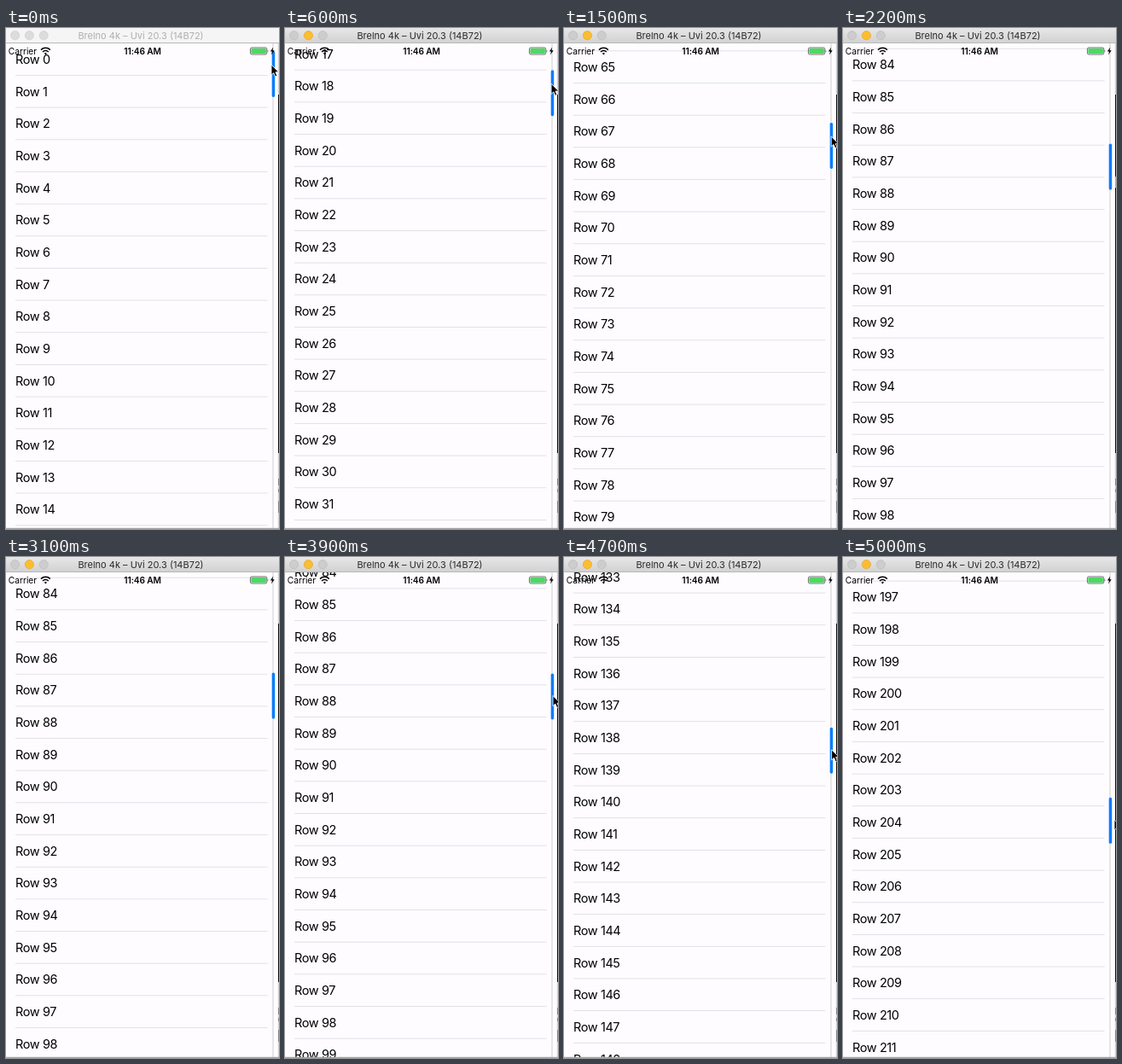
An HTML page that plays this animation: 320x587 px, repeating every 5100 ms.

```html
<!DOCTYPE html>
<html lang="en">
<head>
<meta charset="utf-8">
<style>
  html, body { margin: 0; width: 100%; height: 100%; overflow: hidden; background: #fefcff; }
  svg { display: block; width: 100%; height: 100%; }
  text { font-family: Inter, Roboto, sans-serif; white-space: pre; }
  #rows text { font-size: 14.5px; letter-spacing: -.4px; }
  #rows rect { fill: #dfdee2; }
</style>
</head>
<body>
<svg viewBox="0 0 320 587">
  <defs>
    <linearGradient id="active" x2="0" y2="1">
      <stop stop-color="#e8e7e8"/><stop offset="1" stop-color="#d2d1d2"/>
    </linearGradient>
  </defs>
  <rect width="320" height="587" fill="#fefcff"/>
  <g id="rows"></g>
  <rect x="312.5" y="18" width="1" height="568" fill="#cfced2"/>
  <rect id="thumb" x="311.7" width="3.5" height="54" rx="1.7" fill="#087cfb"/>

  <g font-size="10.2">
    <text x="2.8" y="30.8">Carrier</text>
    <text x="160" y="30.8" text-anchor="middle" font-weight="600" letter-spacing="-.15">11:46 AM</text>
  </g>
  <g fill="none" stroke="#000" stroke-width="1.5">
    <path d="M41 25.6a7.6 7.6 0 0 1 10.8 0M43 28a4.8 4.8 0 0 1 6.8 0"/>
    <path d="M46.4 31.4l-1.6-1.7a2.3 2.3 0 0 1 3.2 0z" fill="#000" stroke="none"/>
  </g>
  <rect x="286.4" y="23" width="19.4" height="8" rx="1.8" fill="none" stroke="#333" stroke-width=".7"/>
  <rect x="287.3" y="23.9" width="17.6" height="6.2" rx="1" fill="#4cd964"/>
  <path d="M306.7 25.5q1.5 1.5 0 3z" fill="#333"/>
  <path d="M313.2 22.4l-3.3 5h2.1l-1 4 3.7-5.2h-2.2z"/>

  <rect id="bar" width="320" height="17.5"/>
  <rect y="17" width="320" height="1" fill="#b9b8b9"/>
  <g id="lights" stroke-width=".6"></g>
  <text id="title" x="158" y="13" font-size="11" text-anchor="middle">Brelno 4k – Uvi 20.3 (14B72)</text>

  <rect x="318.8" y="18" width="1.2" height="569" fill="#d4d3d5"/>
  <rect x="319" y="78" width="1" height="420" fill="#111"/>
  <path d="M319.5 528v8m0 4v4m0 10v14" stroke="#888"/>
  <rect y="585.8" width="320" height="1.2" fill="#a3a2a4"/>
  <path id="cursor" d="M0 0V12.2L2.8 9.6 4.7 14 6.9 13.1 5 8.8H8.8Z" stroke="#fff" stroke-width=".9"/>
</svg>
<script>
const $ = id => document.getElementById(id);
const LOOP = 5100, STEP = 100, PITCH = 37.66, COUNT = 17;

// [time, value] keys: two drags with a pause between them, then a fast pull.
const scrollKeys = [[300, 0], [600, 646.5], [1100, 1666], [2100, 3157], [3500, 3157],
  [3900, 3182], [4400, 4201], [4500, 4201], [5000, 7408.7]];
const swayKeys = [[0, 311], [1100, 313], [3900, 314], [4400, 311], [5000, 318]];

const slope = (k, i) => (k[i + 1][1] - k[i][1]) / (k[i + 1][0] - k[i][0]);

// Tangent that never overshoots the keys.
function tangent(k, i) {
  if (i === 0) return 0;
  if (i === k.length - 1) return slope(k, i - 1);
  const a = slope(k, i - 1), b = slope(k, i);
  return a * b > 0 ? 2 * a * b / (a + b) : 0;
}

function curve(k, t) {
  if (t <= k[0][0]) return k[0][1];
  const i = k.findIndex(p => p[0] >= t) - 1;
  if (i < 0) return k[k.length - 1][1];
  const h = k[i + 1][0] - k[i][0], u = (t - k[i][0]) / h, v = 1 - u;
  return v * v * (1 + 2 * u) * k[i][1] + u * u * (3 - 2 * u) * k[i + 1][1]
    + h * u * v * (v * tangent(k, i) - u * tangent(k, i + 1));
}

$('rows').innerHTML = '<g><text x="11"/><rect x="11" y="13" width="295.5" height=".9"/></g>'.repeat(COUNT);
$('lights').innerHTML = [0, 1, 2].map(i => `<circle cx="${10.6 + 16.8 * i}" cy="8.7" r="5.1"/>`).join('');
const rows = [...$('rows').children], lights = [...$('lights').children];
const move = (el, x, y) => el.setAttribute('transform', `translate(${x} ${y})`);

function paint(el, fill, stroke) {
  el.setAttribute('fill', fill);
  if (stroke) el.setAttribute('stroke', stroke);
}

function draw(t) {
  const scroll = curve(scrollKeys, t), thumb = 27 + scroll * .0344;
  const first = Math.max(0, Math.floor(scroll / PITCH) - 1);
  rows.forEach((row, i) => {
    const n = first + i;
    row.firstChild.textContent = 'Row ' + n;
    move(row, 0, (42 + n * PITCH - scroll).toFixed(2));
  });
  $('thumb').setAttribute('y', thumb);

  // The pointer holds the thumb, and leaves the window between the drags.
  const away = Math.sin(Math.PI * Math.min(1, Math.max(0, (t - 2100) / 1200)));
  const grip = t > 2100 ? 26 : 16;
  move($('cursor'), curve(swayKeys, t) + 22 * away, thumb + grip + 50 * away);

  const active = t >= 400;
  paint($('bar'), active ? 'url(#active)' : '#f6f5f6');
  paint($('title'), active ? '#2b2a2b' : '#b0afb0');
  lights.forEach(c => active ? paint(c, '#cecdce', '#b8b7b8') : paint(c, '#dddcdd', '#cbcacb'));
  if (active) paint(lights[1], '#fdbd2e', '#dfa023');
}

const start = performance.now();
function tick() {
  const t = (performance.now() - start) % LOOP;
  draw(Math.floor(t / STEP) * STEP);
  requestAnimationFrame(tick);
}
tick();
</script>
</body>
</html>
```
